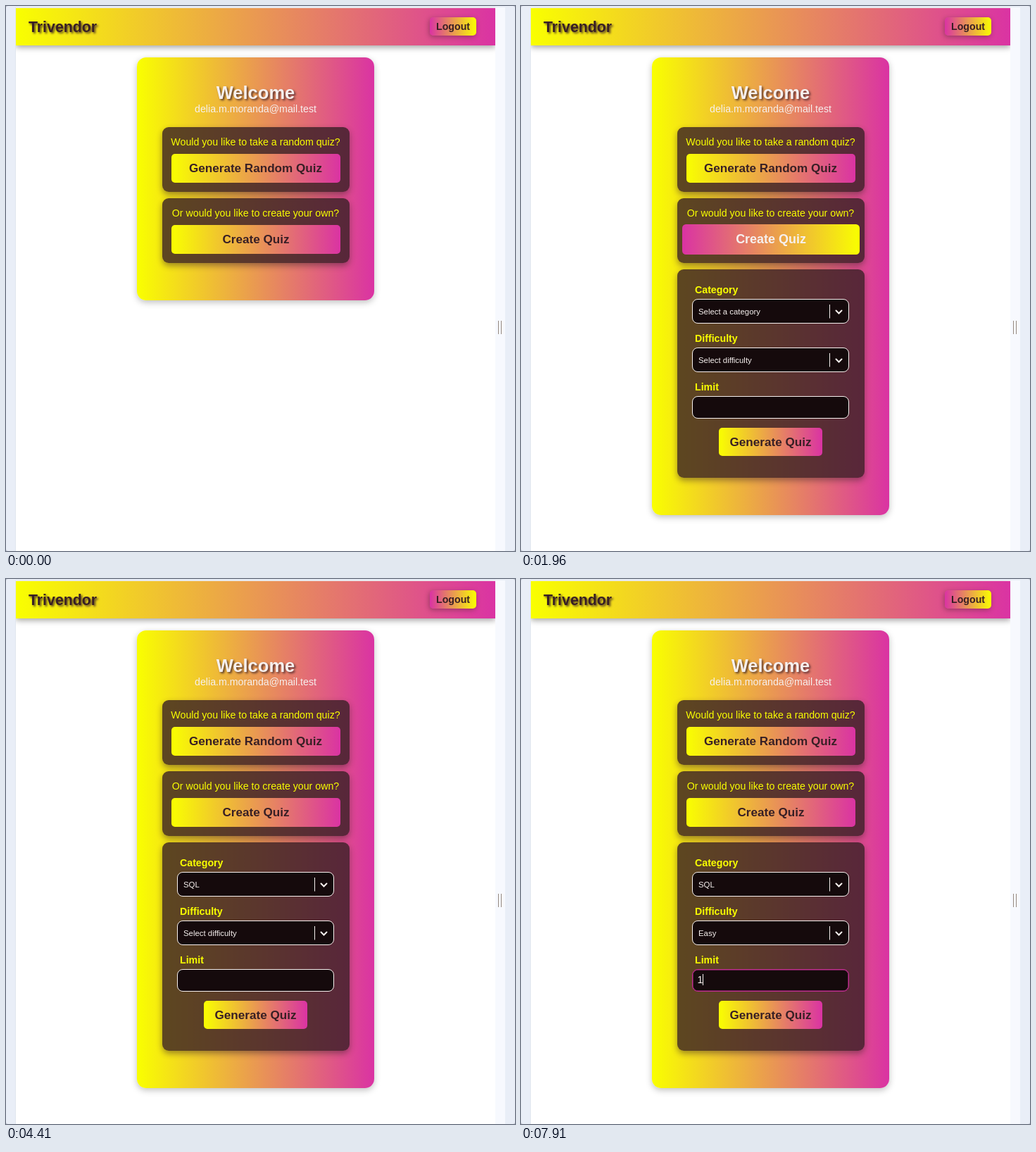
These frames come from a looping animation (723 px wide and 774 px high, 8000 ms). An HTML page:

```html
<!DOCTYPE html>
<html lang="en">
<head>
<meta charset="utf-8">
<title>Quiz builder</title>
<style>
  :root {
    --yellow: #f9ff00;
    --pink: #da33a3;
    --dark: #381f25;
    --light: #f6f0ee;
    --fade: linear-gradient(90deg, var(--yellow), var(--pink));
  }
  html, body { margin: 0; width: 100%; height: 100%; overflow: hidden; background: #b9bec8; }
  * { box-sizing: border-box; }
  .stage {
    position: relative; width: 723px; height: 774px; overflow: hidden;
    border-radius: 3px; background: #e9eef7;
    font-family: "Liberation Sans", Arial, Helvetica, sans-serif;
    font-size: 14.2px; line-height: 20px; color: var(--light);
  }
  .stage div, .stage span, .stage svg { position: absolute; white-space: nowrap; }

  /* window */
  .page { left: 14px; top: 2px; width: 681px; height: 772px; background: #fff; box-shadow: 0 0 1px #b8bcc6; overflow: hidden; }
  .gutter { left: 695px; top: 2px; width: 14px; height: 772px; background: #f7f9fe; }
  .grip { left: 699px; top: 447px; width: 5px; height: 19px; border: solid #94887f; border-width: 0 1px; }
  .bar { left: 0; top: 1px; width: 681px; height: 53px; background: var(--fade); box-shadow: 0 3px 8px rgba(0,0,0,.35); }
  .brand { left: 32px; top: 15px; font: bold 21.3px/30px "Liberation Sans", Arial, sans-serif; color: var(--dark); text-shadow: 2px 2px 3px rgba(56,31,37,.8); }
  .logout {
    left: 602px; top: 16px; width: 66px; height: 26px; border-radius: 5px;
    background: linear-gradient(270deg, var(--yellow), var(--pink));
    box-shadow: -1px 2px 7px rgba(56,31,37,.4);
    color: var(--dark); font-weight: bold; text-align: center; line-height: 26px;
  }

  /* card */
  .card {
    left: 186px; top: 73px; width: 336.5px; height: 345px; border-radius: 13px;
    background: var(--fade); box-shadow: 0 3px 10px rgba(0,0,0,.25);
    animation: grow 8s step-end infinite;
  }
  .mid { left: 0; width: 709px; text-align: center; }
  .title { top: 108px; font: bold 25.5px/30px "Liberation Sans", Arial, sans-serif; text-shadow: 2px 2px 3px rgba(56,31,37,.8); }
  .ask { color: var(--yellow); }
  .panel { left: 221.5px; width: 266px; border-radius: 9px; background: rgba(56,31,37,.8); box-shadow: 0 4px 9px rgba(56,31,37,.45); }
  .btn {
    left: 234.5px; width: 240px; height: 40.5px; border-radius: 5px; background: var(--fade);
    font-size: 17.1px; font-weight: bold; line-height: 41px; text-align: center; color: var(--dark);
  }
  .create { top: 311px; background: none; animation: hover 8s infinite; }
  .create * { inset: 0; border-radius: 5px; }
  .face { background: var(--fade); animation: flip 8s step-end infinite; }
  .tap { background: rgb(51,181,229); opacity: 0; animation: tap 8s linear infinite; }

  /* form */
  .form { left: 0; top: 0; visibility: hidden; animation: form 8s step-end infinite; }
  .label { left: 247px; font-weight: bold; color: var(--yellow); }
  .field { left: 243px; width: 223px; height: 35px; border: 1px solid var(--light); border-radius: 8px; background: #150a0c; font-size: 11.4px; }
  .field span { left: 8px; top: 7.5px; }
  .field svg { right: 0; top: 0; width: 27px; height: 33px; fill: none; stroke: var(--light); }
  .limit { top: 553.5px; height: 32px; animation: focus 8s step-end infinite; }
  .one { left: 250.5px; top: 559px; }
  .caret { width: 1px; height: 16px; background: #8d8385; }
  .limit-caret { left: 251px; top: 561px; background: var(--light); animation: caret3 8s step-end infinite; }

  /* drop-downs */
  .menu {
    left: 243px; width: 223px; border-radius: 6px; overflow: hidden;
    background: rgba(56,31,37,.96); box-shadow: 0 2px 6px rgba(0,0,0,.3);
  }
  .menu p { margin: 0; padding-left: 10px; line-height: 33.6px; position: relative; top: -1px; }
  .menu p:first-child { background: var(--pink); color: var(--dark); }
  .scroll { right: 0; top: 0; width: 5.5px; height: 122px; background: var(--pink); border-radius: 0 0 3px 3px; }

  .dot { width: 20px; height: 20px; border-radius: 50%; background: rgba(84,54,62,.85); border: 1px solid rgba(210,195,195,.65); }

  .hide { visibility: hidden; animation: 8s step-end infinite; }
  .menu1 { animation-name: menu1; }  .menu2 { animation-name: menu2; }
  .caret1 { animation-name: caret1; } .caret2 { animation-name: caret2; }
  .dot1 { animation-name: dot1; }    .dot2 { animation-name: dot2; }    .dot3 { animation-name: dot3; }
  .before-sql { animation: leave1 8s step-end infinite; }  .sql { animation-name: enter1; }
  .before-easy { animation: leave2 8s step-end infinite; } .easy { animation-name: enter2; }
  .one { animation-name: typed; }

  @keyframes grow { 20.125%, 100% { height: 649.5px; } }
  @keyframes form { 20.125%, 100% { visibility: visible; } }
  @keyframes hover {
    0%, 20.12% { transform: none; color: #381f25; animation-timing-function: step-end; }
    20.125% { transform: none; color: #625c5e; animation-timing-function: ease; }
    24.5%, 50.75% { transform: scale(1.05); color: #f6f0ee; animation-timing-function: ease; }
    55.125%, 100% { transform: none; color: #381f25; }
  }
  @keyframes flip { 20.125% { transform: scaleX(-1); } 50.75%, 100% { transform: none; } }
  @keyframes tap { 0%, 20.12% { opacity: 0; } 20.125%, 20.9% { opacity: .4; } 22.75%, 100% { opacity: 0; } }

  @keyframes dot1 { 16.625% { visibility: visible; } 21%, 100% { visibility: hidden; } }
  @keyframes dot2 { 35.875% { visibility: visible; } 40.25%, 100% { visibility: hidden; } }
  @keyframes dot3 { 85.75% { visibility: visible; } 89.25%, 100% { visibility: hidden; } }

  @keyframes menu1 { 35.875% { visibility: visible; } 50.75%, 100% { visibility: hidden; } }
  @keyframes menu2 { 64.75% { visibility: visible; } 73.5%, 100% { visibility: hidden; } }
  @keyframes caret1 { 35.875%, 49% { visibility: visible; } 42.875%, 50.75%, 100% { visibility: hidden; } }
  @keyframes caret2 { 64.75% { visibility: visible; } 71.75%, 100% { visibility: hidden; } }
  @keyframes caret3 {
    0% { opacity: 0; } 85.75% { opacity: 1; } 91.875% { opacity: 0; }
    98.875%, 100% { opacity: 1; transform: translateX(7px); }
  }

  @keyframes leave1 { 50.75%, 100% { opacity: 0; } }
  @keyframes enter1 { 50.75%, 100% { visibility: visible; } }
  @keyframes leave2 { 73.5%, 100% { opacity: 0; } }
  @keyframes enter2 { 73.5%, 100% { visibility: visible; } }
  @keyframes focus { 85.75%, 100% { border-color: #c02f90; box-shadow: inset 0 0 0 .5px #c02f90; } }
  @keyframes typed { 98.875%, 100% { visibility: visible; } }
</style>
</head>
<body>
<div class="stage">
  <div class="page"><div class="bar"></div></div>
  <div class="gutter"></div>
  <div class="grip"></div>
  <span class="brand">Trivendor</span>
  <div class="logout">Logout</div>

  <div class="card"></div>
  <div class="mid title">Welcome</div>
  <div class="mid" style="top:136px">delia.m.moranda@mail.test</div>

  <div class="panel" style="top:172px;height:92px"></div>
  <div class="mid ask" style="top:183px">Would you like to take a random quiz?</div>
  <div class="btn" style="top:210px">Generate Random Quiz</div>

  <div class="panel" style="top:273px;height:91.5px"></div>
  <div class="mid ask" style="top:284px">Or would you like to create your own?</div>
  <div class="btn create">
    <div class="face"></div>
    <div class="tap"></div>
    <span>Create Quiz</span>
  </div>

  <div class="form">
    <div class="panel" style="top:374px;height:295.5px"></div>

    <span class="label" style="top:393px">Category</span>
    <div class="field" style="top:415.5px">
      <span class="before-sql">Select a category</span>
      <span class="hide sql">SQL</span>
      <svg viewBox="0 0 27 33"><path d="M.5 7v19.5"/><path d="M9.5 15.5l4 4 4-4" stroke-width="2" stroke-linecap="round"/></svg>
    </div>

    <span class="label" style="top:462px">Difficulty</span>
    <div class="field" style="top:484.5px">
      <span class="before-easy">Select difficulty</span>
      <span class="hide easy">Easy</span>
      <svg viewBox="0 0 27 33"><path d="M.5 7v19.5"/><path d="M9.5 15.5l4 4 4-4" stroke-width="2" stroke-linecap="round"/></svg>
    </div>

    <span class="label" style="top:531px">Limit</span>
    <div class="field limit"></div>
    <span class="hide one">1</span>
    <div class="caret limit-caret"></div>

    <div class="btn" style="left:281px;top:598.5px;width:147px">Generate Quiz</div>
  </div>

  <div class="caret hide caret1" style="left:252px;top:425px"></div>
  <div class="caret hide caret2" style="left:252px;top:494px"></div>

  <div class="menu hide menu1" style="top:458.5px;height:265px">
    <p>Linux</p><p>bash</p><p>Docker</p><p>SQL</p><p>CMS</p><p>Code</p><p>DevOps</p><p>React</p>
    <div class="scroll"></div>
  </div>
  <div class="menu hide menu2" style="top:527.5px;height:100px">
    <p>Easy</p><p>Medium</p><p>Hard</p>
  </div>

  <div class="dot hide dot1" style="left:379.5px;top:327.5px"></div>
  <div class="dot hide dot2" style="left:440.5px;top:432.5px"></div>
  <div class="dot hide dot3" style="left:306px;top:562.5px"></div>
</div>
</body>
</html>
```
